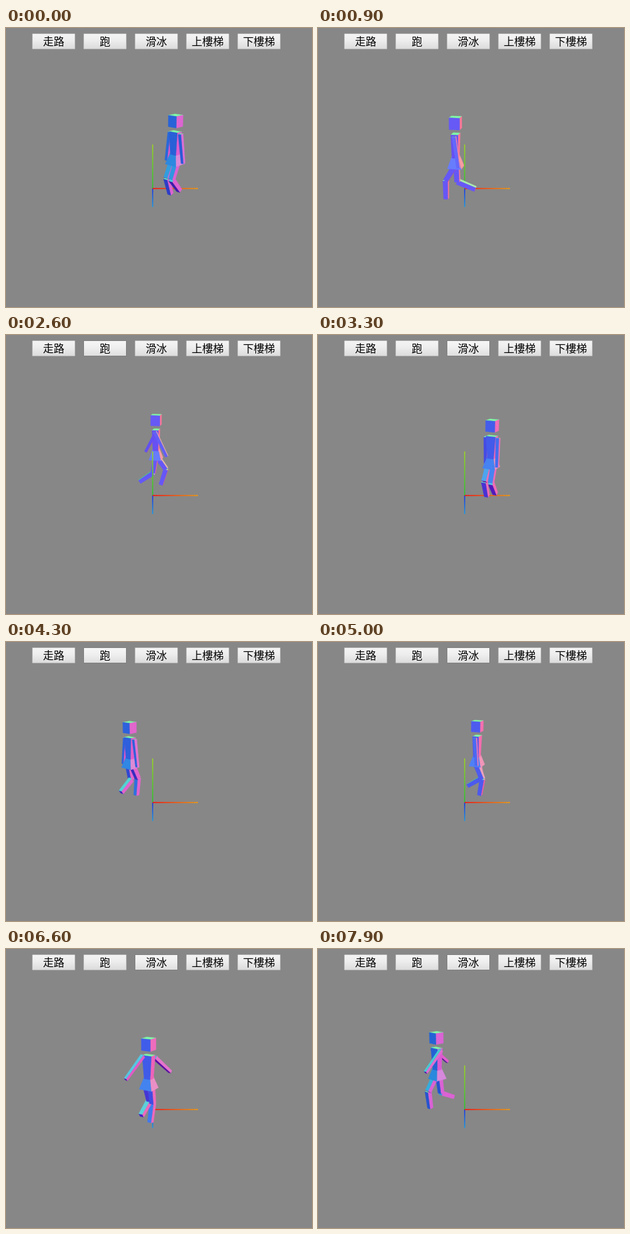
Write an HTML page with a canvas that moves like this. It is 459 px wide and 418 px high and loops after 8 s.

```html
<!DOCTYPE html>
<html lang="zh-Hant">
<head>
<meta charset="utf-8">
<title>人物動作</title>
<style>
html, body { margin: 0; width: 100%; height: 100%; overflow: hidden; background: #878787; }
canvas { position: absolute; left: 0; top: 0; }
button {
  position: absolute; top: 8px; width: 65px; height: 24px; padding: 0 0 2px; box-sizing: border-box;
  border: 1px solid #b0b0b0; border-radius: 1px; color: #000;
  background: linear-gradient(#f4f4f4, #eee 40%, #dcdcdc);
  font: 16px/20px "Noto Sans CJK TC", "Noto Sans CJK", "Noto Sans CJK SC", sans-serif;
}
button.hover { border-color: #808080; background: linear-gradient(#f6f6f6, #f0f0f0 40%, #dfdfdf); }
</style>
</head>
<body>
<canvas width="459" height="418"></canvas>
<script>
const LOOP = 8000, STEP = 100;
const FOCAL = 550, CX = 220, CY = 209.4, PITCH = 18;
const RADIUS = 40, CENTRE = -1;
const ctx = document.querySelector('canvas').getContext('2d');

const buttons = ['走路', '跑', '滑冰', '上樓梯', '下樓梯'].map((label, i) => {
  const b = document.createElement('button');
  b.textContent = label;
  b.style.left = 39 + 77 * i + 'px';
  return document.body.appendChild(b);
});
// [start time, hovered button]
const HOVER = [[0, -1], [200, 3], [500, -1], [1200, 0], [1500, 1], [3000, 2], [3900, 1], [4400, -1], [4700, 2]];

// Key points of the walk around the circle: [time, angle, heading]
const PATH = [[0, 53, -43], [1800, -85, -160], [3300, -280, -388], [4300, -485, -580],
  [5700, -655, -726], [6600, -726, -930], [7900, -820, -1125]];

// rate is in degrees per second; each bout eases in from a crouch and back
const BOUTS = [
  { from: -300, to: 3600, rate: 240, phase: -59, strength: 1, arm: 30, hop: 0 },
  { from: 3600, to: 5700, rate: 500, phase: 40, strength: 0.7, arm: 60, hop: 3 },
  { from: 5700, to: 8800, rate: 346, phase: 34, strength: 1, arm: 72, hop: 0 }
];

const sin = d => Math.sin(d * Math.PI / 180);
const cos = d => Math.cos(d * Math.PI / 180);
const add = (a, b, k = 1) => a.map((v, i) => v + b[i] * k);
const sub = (a, b) => add(a, b, -1);
const dot = (a, b) => a[0] * b[0] + a[1] * b[1] + a[2] * b[2];
const cross = (a, b) => [a[1] * b[2] - a[2] * b[1], a[2] * b[0] - a[0] * b[2], a[0] * b[1] - a[1] * b[0]];
const unit = a => { const n = Math.hypot(...a); return a.map(v => v / n); };

const view = ([x, y, z]) => [x, -31 + y * cos(PITCH) - z * sin(PITCH),
  -FOCAL + y * sin(PITCH) + z * cos(PITCH)];
const screen = ([x, y, z]) => [CX - FOCAL * x / z, CY + FOCAL * y / z];

function pathAt(t) {
  const i = Math.max(1, PATH.findIndex(p => p[0] >= t));
  const a = PATH[i - 1], b = PATH[i];
  const u = (t - a[0]) / (b[0] - a[0]);
  return a.map((v, j) => v + (b[j] - v) * u);
}

function poseAt(t) {
  const b = BOUTS.find(b => t < b.to);
  const energy = b.strength * Math.min(1, 1.4 * sin(180 * (t - b.from) / (b.to - b.from)));
  const phase = b.phase + b.rate * (t - b.from) / 1000;
  const crouch = 1 - energy;
  const splay = 3 + 7 * energy * Math.abs(cos(phase));
  // opposite limbs move half a cycle apart
  const legs = [0, 180].map(shift => {
    const thigh = 14 + 18 * crouch + 22 * energy * sin(phase + shift);
    const knee = 49 + 9 * crouch - 28 * energy * cos(phase + shift);
    return [thigh, thigh - knee];
  });
  const arms = [150, 330].map(shift => [b.arm * energy * sin(phase + shift), splay]);
  return { arms, legs, bob: b.hop * energy };
}

const CORNERS = [[-1, -1], [1, -1], [1, 1], [-1, 1]];
const SIDES = [0, 1, 2, 3].map(i => [i, (i + 1) % 4, (i + 1) % 4 + 4, i + 4]);
const FACES = [[0, 1, 2, 3], [4, 5, 6, 7], ...SIDES];

// Tapered box from p to q; s and e are half sizes [side, depth] at its ends.
function prism(p, q, side, s, e = s) {
  const axis = unit(sub(q, p));
  const u = unit(add(side, axis, -dot(side, axis)));
  const v = cross(axis, u);
  const ring = (o, [w, d]) => CORNERS.map(([a, b]) => view(add(add(o, u, a * w), v, b * d)));
  const pts = [...ring(p, s), ...ring(q, e)];
  const mid = view(add(p, sub(q, p), 0.5));
  for (const face of FACES) {
    const f = face.map(i => pts[i]);
    const centre = f.reduce((a, b) => add(a, b)).map(c => c / 4);
    let n = unit(cross(sub(f[2], f[0]), sub(f[3], f[1])));
    if (dot(n, sub(centre, mid)) < 0) n = n.map(c => -c);
    if (dot(n, centre) >= 0) continue;
    ctx.fillStyle = ctx.strokeStyle = `rgb(${n.map(c => Math.round((c * 0.5 + 0.5) * 255))})`;
    ctx.lineWidth = 0.4;
    ctx.beginPath();
    f.forEach(c => ctx.lineTo(...screen(c)));
    ctx.closePath();
    ctx.fill();
    ctx.stroke();
  }
}

function drawAxes() {
  const line = (tip, from, to) => {
    const a = screen(view([0, 0, 0])), b = screen(view(tip));
    const g = ctx.createLinearGradient(...a, ...b);
    g.addColorStop(0, from);
    g.addColorStop(1, to);
    ctx.strokeStyle = g;
    ctx.lineWidth = 1.5;
    ctx.beginPath();
    ctx.moveTo(...a);
    ctx.lineTo(...b);
    ctx.stroke();
  };
  line([0, 0, 68], '#1030e8', '#189ae8');
  line([0, 68, 0], '#28c428', '#9cd820');
  line([68, 0, 0], '#ff0800', '#f59a08');
}

function drawFigure(t, x, z, yaw) {
  const { arms, legs, bob } = poseAt(t);
  const side = [cos(yaw), 0, -sin(yaw)], ahead = [sin(yaw), 0, cos(yaw)];
  const at = (y, lateral = 0) => add([x, y + bob, z], side, lateral);
  const reach = (p, length, swing, splay = 0) => {
    const q = add(p, side, length * sin(splay));
    const r = add(q, ahead, length * cos(splay) * sin(swing));
    return add(r, [0, -length * cos(splay) * cos(swing), 0]);
  };
  const depth = p => view(p)[2];

  const limbs = arms.map(([swing, splay], i) => {
    const sign = i ? 1 : -1, p = at(90, 9.2 * sign);
    const q = reach(p, 41, swing, splay * sign);
    return { p, q, near: (depth(p) + depth(q)) / 2 - depth(at(70)) };
  }).sort((a, b) => a.near - b.near);
  const drawArm = a => prism(a.p, a.q, side, [2.4, 2.4], [2, 2]);

  const bones = legs.flatMap(([thigh, shin], i) => {
    const hip = at(50, i ? 3.9 : -3.9);
    const knee = reach(hip, 26, thigh), foot = reach(knee, 27, shin);
    return [[hip, knee, 3.6, 3.3], [knee, foot, 3.4, 3]];
  });
  const middle = ([p, q]) => depth(p) + depth(q);
  bones.sort((a, b) => middle(a) - middle(b));

  limbs.filter(a => a.near < 0).forEach(drawArm);
  bones.forEach(([p, q, s, e]) => prism(p, q, side, [s, s], [e, e]));
  prism(at(62), at(46), side, [4.8, 4.4], [9.6, 9.4]);
  prism(at(92), at(60), side, [7.2, 4.8], [4.9, 4.1]);
  limbs.filter(a => a.near >= 0).forEach(drawArm);
  prism(at(114.5), at(99), side, [7, 7]);
}

function draw(t) {
  const [, angle, yaw] = pathAt(t);
  const x = CENTRE + RADIUS * sin(angle), z = RADIUS * cos(angle);
  ctx.fillStyle = '#878787';
  ctx.fillRect(0, 0, 459, 418);
  if (z >= 0) drawAxes();
  drawFigure(t, x, z, yaw);
  if (z < 0) drawAxes();
  const active = HOVER.filter(h => h[0] <= t).pop()[1];
  buttons.forEach((b, i) => b.classList.toggle('hover', i === active));
}

const start = performance.now();
function tick() {
  const t = (performance.now() - start) % LOOP;
  draw(Math.floor(t / STEP) * STEP);
  requestAnimationFrame(tick);
}
tick();
</script>
</body>
</html>
```
